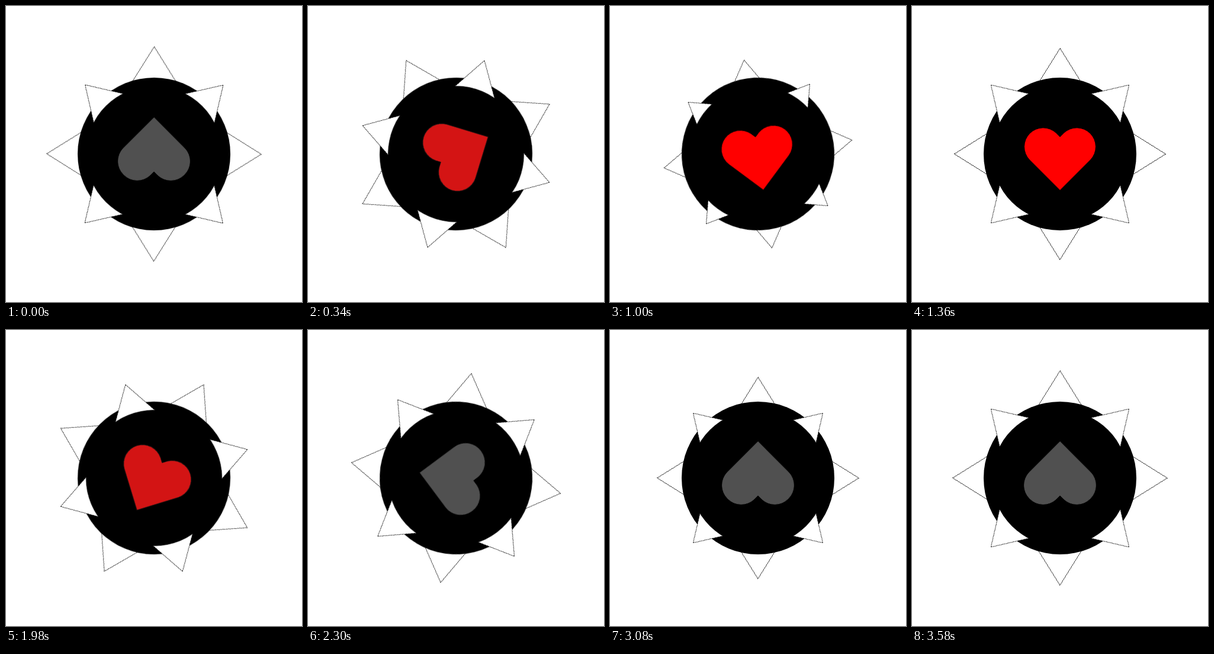
An HTML page that plays this animation: 500 px wide and 500 px high, repeating every 3.6 s.

```html
<!DOCTYPE html>
<html lang="en">
<head>
<meta charset="utf-8">
<title>Spiked heart</title>
<style>
  html, body { margin: 0; width: 100%; height: 100%; overflow: hidden; background: #fff; }
  svg { display: block; width: 100%; height: 100%; }

  .spin, .spike, .heart { animation: 3600ms linear infinite; }
  .spin { animation-name: spin; }
  .heart { animation-name: tint; stroke-width: 1; }

  .spike {
    animation-name: pump;
    fill: #fff;
    stroke: #000;
    stroke-width: .75;
    shape-rendering: crispEdges;
  }
  .back .spike { --rest: -2.7px; }
  .front .spike { --rest: 0px; }

  /* Half a turn per beat */
  @keyframes spin {
    0% {
      transform: rotate(180deg);
      animation-timing-function: cubic-bezier(.325, .27, .49, 1);
    }
    35.28% { transform: rotate(360deg); }
    50% {
      transform: rotate(360deg);
      animation-timing-function: cubic-bezier(.325, .27, .49, 1);
    }
    85.28%, 100% { transform: rotate(540deg); }
  }

  /* Spikes sink into the disc and come back out */
  @keyframes pump {
    0% {
      transform: rotate(var(--a)) translateY(var(--rest));
      animation-timing-function: ease-in-out;
    }
    13.61%, 63.61% {
      transform: rotate(var(--a)) translateY(0);
      animation-timing-function: cubic-bezier(.37, 0, .63, 1);
    }
    24.72%, 74.72% {
      transform: rotate(var(--a)) translateY(31px);
      animation-timing-function: cubic-bezier(.333, .667, .667, 1);
    }
    37.78%, 50% { transform: rotate(var(--a)) translateY(0); }
    100% { transform: rotate(var(--a)) translateY(var(--rest)); }
  }

  @keyframes tint {
    0%, 64.44%, 100% {
      fill: #505050;
      stroke: #505050;
      animation-timing-function: ease-in-out;
    }
    14.44%, 50% {
      fill: #f00;
      stroke: #000;
      animation-timing-function: ease-in-out;
    }
  }
</style>
</head>
<body>
<svg viewBox="-250 -250 500 500">
  <defs>
    <path id="outer" d="M0-179.5l50 80h-100z"/>
    <path id="inner" d="M0-165l50 80h-100z"/>
  </defs>
  <g class="spin">
    <g class="back">
      <use class="spike" href="#outer" style="--a:0deg"/>
      <use class="spike" href="#outer" style="--a:90deg"/>
      <use class="spike" href="#outer" style="--a:180deg"/>
      <use class="spike" href="#outer" style="--a:270deg"/>
    </g>
    <circle r="129"/>
    <g class="front">
      <use class="spike" href="#inner" style="--a:45deg"/>
      <use class="spike" href="#inner" style="--a:135deg"/>
      <use class="spike" href="#inner" style="--a:225deg"/>
      <use class="spike" href="#inner" style="--a:315deg"/>
    </g>
    <circle r="115"/>
    <path class="heart" d="M0 61.4L-51.6 9.8A32 32 0 0 1-6.37-35.45L0-29.1L6.37-35.45A32 32 0 0 1 51.6 9.8Z"/>
  </g>
</svg>
</body>
</html>
```
